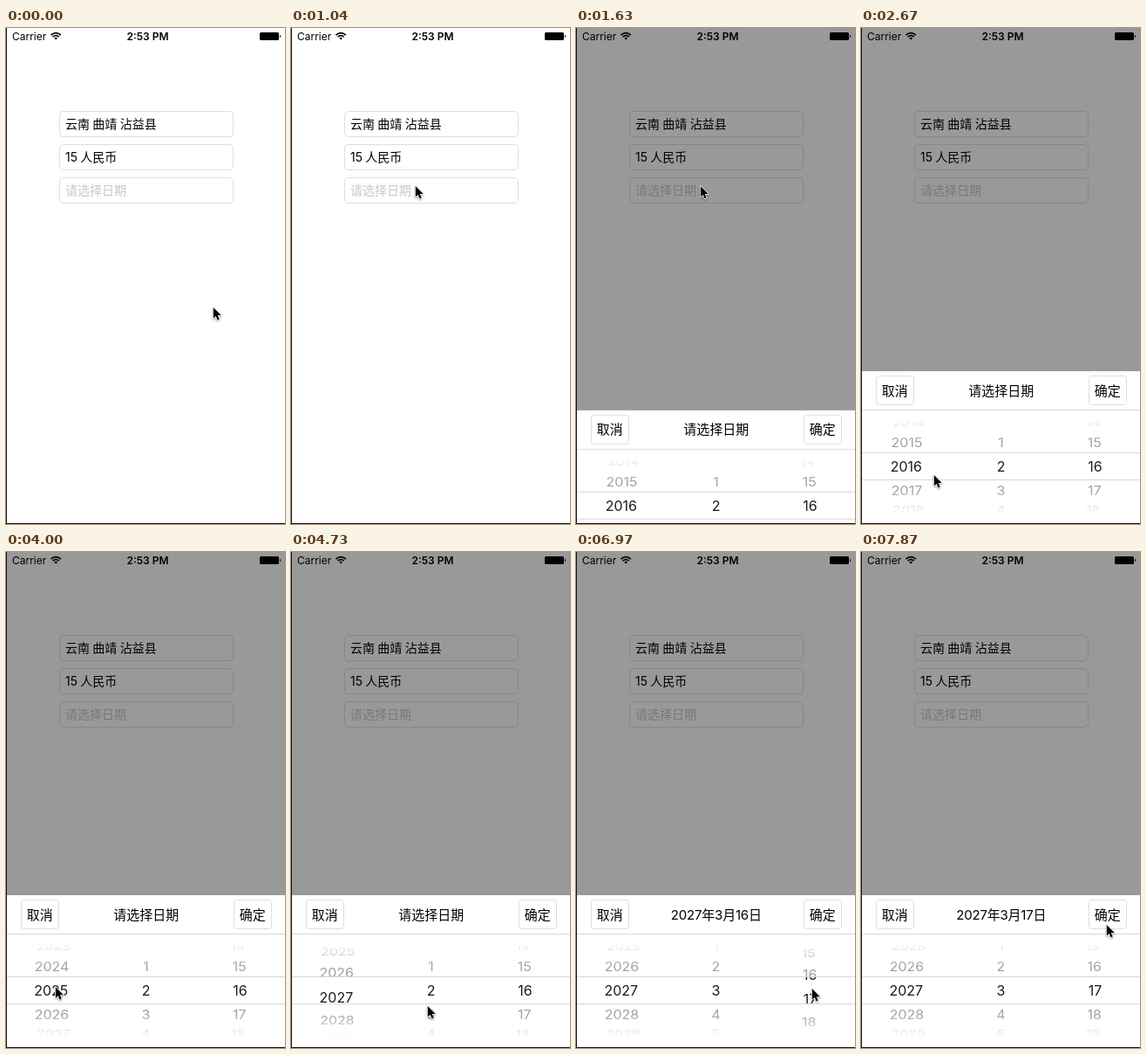
Recreate the animation shown at these times as an HTML page. Size 320 px wide and 568 px high, loop 8 s.

```html
<!DOCTYPE html>
<html lang="zh-CN">
<head>
<meta charset="utf-8">
<title>Date picker</title>
<style>
  html, body { margin: 0; width: 100%; height: 100%; overflow: hidden; background: #fff; }
  svg { display: block; width: 320px; height: 568px; }
  text { font-family: Inter, "Noto Sans CJK SC", "Noto Sans CJK", sans-serif; fill: #000; }
  .field { font-size: 14px; word-spacing: -.6px; }
  .hint { fill: #c7c7cc; }
  .box { fill: #fff; stroke: #dedede; }
  .bar { font-size: 15px; letter-spacing: -.2px; }
  .plain { letter-spacing: 0; }
  .mid { text-anchor: middle; }
  .row { font-size: 16px; text-anchor: middle; }
  .far .row { fill: #a0a0a0; }
  .near .row { fill: #1c1c1c; }
  .rule { fill: #d8d8d8; }
  #arrow { filter: drop-shadow(0 1px 1px rgba(0, 0, 0, .4)); }
</style>
</head>
<body>
<svg viewBox="0 0 320 568">
  <defs>
    <linearGradient id="fade" x1="0" y1="0" x2="0" y2="1">
      <stop offset=".08" stop-color="#fff"/>
      <stop offset=".28" stop-color="#fff" stop-opacity="0"/>
      <stop offset=".72" stop-color="#fff" stop-opacity="0"/>
      <stop offset=".92" stop-color="#fff"/>
    </linearGradient>
    <clipPath id="window"><rect x="1" y="94" width="319" height="30"/></clipPath>
    <clipPath id="drum"><rect x="1" y="45" width="319" height="128"/></clipPath>
  </defs>

  <rect width="320" height="568" fill="#fff"/>
  <g id="form"></g>
  <rect id="dim" width="320" height="568" fill-opacity=".4"/>

  <g id="status">
    <text x="7" y="14" font-size="12">Carrier</text>
    <g fill="none" stroke="#000" stroke-width="1.7">
      <path d="M51.5 8.1Q57.2 3 62.9 8.1M53.6 10.2Q57.2 7.1 60.8 10.2"/>
      <path d="M55.3 11.5Q57.2 9.9 59.1 11.5L57.2 13.6Z" fill="#000" stroke="none"/>
    </g>
    <text class="mid" x="162.5" y="14" font-size="12" font-weight="600">2:53 PM</text>
    <rect x="291" y="5" width="22" height="9" rx="1.5"/>
    <path d="M314 8a1.6 1.6 0 0 1 0 3Z"/>
  </g>

  <g id="sheet">
    <rect x="1" width="319" height="175" fill="#fff"/>
    <rect class="box" x="17.5" y="5.5" width="43" height="33" rx="3"/>
    <rect class="box" x="261.5" y="5.5" width="43" height="33" rx="3"/>
    <text class="bar plain mid" x="38.7" y="27.5">取消</text>
    <text class="bar plain mid" x="282.7" y="27.5">确定</text>
    <text class="bar mid" id="title" x="160.8" y="27.5"></text>
    <rect class="rule" x="1" y="44" width="319" height="1"/>
    <g class="far" clip-path="url(#drum)"></g>
    <rect x="1" y="45" width="319" height="128" fill="url(#fade)"/>
    <g class="near" clip-path="url(#window)">
      <rect x="1" y="94" width="319" height="30" fill="#fff"/>
    </g>
    <rect class="rule" x="1" y="93" width="319" height="1"/>
    <rect class="rule" x="1" y="124" width="319" height="1"/>
  </g>

  <path d="M0 0H1V567H320V568H0Z" fill="#111"/>
  <path id="arrow" d="M.8 .9V13.6L3.7 11L5.7 15.5L7.7 14.6L5.8 10.1H9.8Z"
        stroke="#fff" stroke-width="1.5" paint-order="stroke" stroke-linejoin="round"/>
</svg>
<script>
const LOOP = 8000, TICK = 148.3, LAST = 53;
const RADIUS = 63, STEP = 25.8 * Math.PI / 180, AXIS = 109;
const OPEN = 9, OPENED = 12, TOP = 393, BOTTOM = 566;
const HINT = '请选择日期';

// Pointer stops: tick, x, y
const STOPS = [
  [0, 237, 319], [7, 142, 180], [14, 142, 180], [18, 83, 511], [20, 76, 533], [24, 60, 480],
  [26, 55, 507], [28.5, 58, 479], [32, 156, 519], [34, 160, 524], [37, 166, 492],
  [40, 194, 494], [45, 270, 522], [48, 270, 491], [53, 281, 426]
];

const $ = s => document.querySelector(s);
const clamp = p => Math.max(0, Math.min(1, p));
const smooth = p => p * p * (3 - 2 * p);
const slow = p => 1 - (1 - p) ** 2;
const phase = (from, to, n) => clamp((n - from) / (to - from));
const mix = (a, b, p) => a + (b - a) * p;

// a flick coasts to a stop over the given ticks
const flick = (from, to, rows) => n => rows * slow(phase(from, to, n));
const wheel = (x, lean, first, ...flicks) => ({
  x, lean,
  value: n => first + flicks.reduce((sum, f) => sum + f(n), 0),
  layers: ['.far', '.near'].map(s =>
    Array.from({ length: 7 }, () => add($(s), 'text', { class: 'row', y: 5.8 })))
});

function add(parent, tag, attrs, text = '') {
  const el = document.createElementNS('http://www.w3.org/2000/svg', tag);
  for (const k in attrs) el.setAttribute(k, attrs[k]);
  el.textContent = text;
  return parent.appendChild(el);
}

['云南 曲靖 沾益县', '15 人民币', HINT].forEach((label, i) => {
  const y = 95.5 + 38 * i;
  add($('#form'), 'rect', { class: 'box', x: 61.5, y, width: 199, height: 29, rx: 4.5 });
  add($('#form'), 'text', { class: i < 2 ? 'field' : 'field hint', x: 68, y: y + 19.5 }, label);
});

// lean shifts outer columns towards the middle as rows turn away
const wheels = [
  wheel(51.8, 7, 2016, flick(20, 27, 9), flick(27, 35, 2)),
  wheel(160.5, 0, 2, flick(34.5, 39, 1)),
  wheel(268.5, -7, 16, flick(45, 50, 1))
];

function turn({ x, lean, value, layers }, n) {
  const pos = value(n), base = Math.round(pos);
  for (const rows of layers) rows.forEach((row, i) => {
    const label = base + i - 3, angle = (label - pos) * STEP, squeeze = Math.cos(angle);
    const shown = label > 0 && squeeze > .15;
    row.textContent = shown ? label : '';
    const cx = x + lean * (1 - squeeze), cy = AXIS + RADIUS * Math.sin(angle);
    row.setAttribute('transform', `translate(${cx} ${cy}) scale(1 ${squeeze})`);
  });
}

function pointer(n) {
  const i = Math.max(1, STOPS.findIndex(s => s[0] >= n));
  const [from, x, y] = STOPS[i - 1], [to, x2, y2] = STOPS[i];
  const p = smooth(phase(from, to, n));
  return [mix(x, x2, p), mix(y, y2, p)];
}

// the title follows the wheels shortly after they settle
function title(n) {
  const [y, m, d] = wheels.map(w => Math.floor(w.value(n - 1.5)));
  return y < 2027 ? HINT : `${y}年${m}月${d}日`;
}

function draw(time) {
  // the picture advances in whole ticks
  const n = Math.min(LAST, Math.floor((time % LOOP + 20) / TICK));
  const top = mix(BOTTOM, TOP, smooth(phase(OPEN, OPENED, n)));
  for (const id of ['#dim', '#sheet']) $(id).style.display = n < OPEN ? 'none' : '';
  $('#sheet').setAttribute('transform', `translate(0 ${top})`);
  $('#arrow').setAttribute('transform', `translate(${pointer(n)})`);
  $('#title').textContent = title(n);
  $('#title').classList.toggle('plain', title(n) === HINT);
  wheels.forEach(w => turn(w, n));
}

const start = performance.now();
function frame() {
  draw(performance.now() - start);
  requestAnimationFrame(frame);
}
frame();
</script>
</body>
</html>
```
